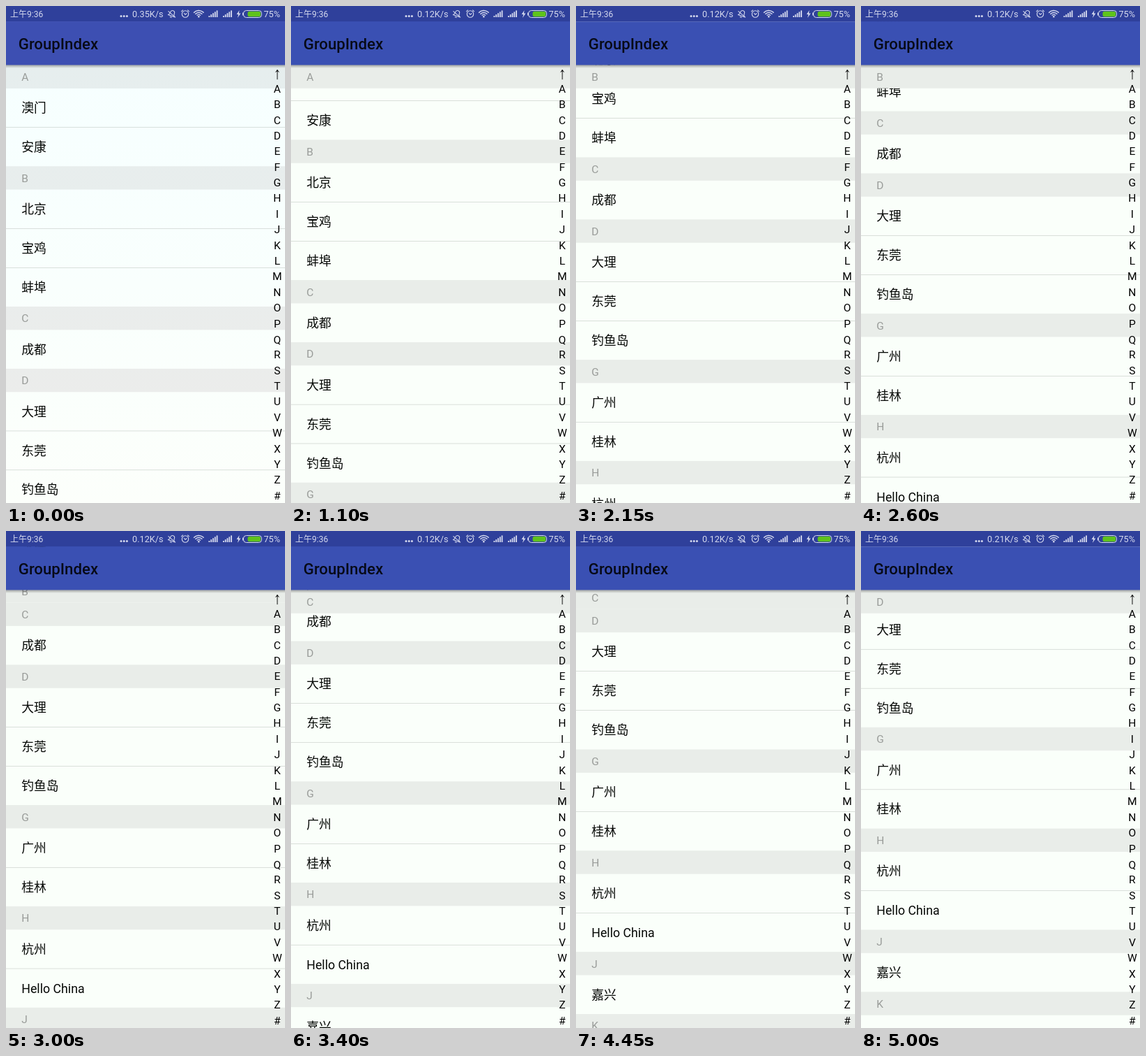
Recreate the animation shown at these times as an HTML page with a canvas. Size 400x711 px, loop 5.05 s.

```html
<!DOCTYPE html>
<html lang="zh-CN">
<head>
<meta charset="utf-8">
<style>
  html, body { margin: 0; width: 100%; height: 100%; overflow: hidden; background: #fafffa; }
  canvas { display: block; width: 400px; height: 711px; }
</style>
</head>
<body>
<canvas id="stage"></canvas>
<script>
const W = 400, H = 711, LOOP = 5050, STEP = 50;
const U = 400 / 1080;               // phone pixels to stage pixels
const LIST_TOP = 228 * U, HEAD = 90 * U, ROW = 150 * U, LINE = U;
const FONT = 'Roboto, "Noto Sans CJK SC", "Noto Sans CJK", sans-serif';
const INDEX = '↑ABCDEFGHIJKLMNOPQRSTUVWXYZ#';
const GROUPS = [
  ['A', '澳门', '安康'],
  ['B', '北京', '宝鸡', '蚌埠'],
  ['C', '成都'],
  ['D', '大理', '东莞', '钓鱼岛'],
  ['G', '广州', '桂林'],
  ['H', '杭州', 'Hello China'],
  ['J', '嘉兴'],
  ['K', '']
];
const SCROLL = [[850, 0], [1100, 37.9], [1650, 130.3], [2600, 279.5],
  [3400, 361.4], [3950, 381.3], [5000, 438.8]];

const canvas = document.getElementById('stage');
const ctx = canvas.getContext('2d');
const dpr = window.devicePixelRatio || 1;
canvas.width = Math.round(W * dpr);
canvas.height = Math.round(H * dpr);

// Lay the list out once, in unscrolled stage coordinates.
let cursor = LIST_TOP;
const sections = GROUPS.map(([label, ...names]) => {
  const top = cursor;
  cursor += HEAD;
  const rows = names.map((name, i) => {
    if (i) cursor += LINE;
    const row = { name, top: cursor, divided: i < names.length - 1 };
    cursor += ROW;
    return row;
  });
  return { label, top, rows };
});

// Monotone cubic through the scroll keys.
const slopes = SCROLL.slice(1).map(([t, y], i) => (y - SCROLL[i][1]) / (t - SCROLL[i][0]));
const tangents = SCROLL.map((_, i) => {
  const a = slopes[i - 1], b = slopes[i];
  if (a === undefined) return b;
  if (b === undefined) return a;
  return 2 * a * b / (a + b);
});
function scrollAt(t) {
  if (t <= SCROLL[0][0]) return 0;
  let i = 0;
  while (i < SCROLL.length - 2 && t > SCROLL[i + 1][0]) i++;
  const [t0, y0] = SCROLL[i], [t1, y1] = SCROLL[i + 1];
  const d = t1 - t0, u = Math.min(1, (t - t0) / d), v = 1 - u;
  return y0 * v * v * (1 + 2 * u) + y1 * u * u * (3 - 2 * u)
    + d * u * v * (tangents[i] * v - tangents[i + 1] * u);
}

function rect(x, y, w, h, color) {
  ctx.fillStyle = color;
  ctx.fillRect(x, y, w, h);
}
function text(str, x, y, size, color, align = 'left', weight = 400) {
  ctx.font = `${weight} ${size}px ${FONT}`;
  ctx.textAlign = align;
  ctx.fillStyle = color;
  ctx.fillText(str, x, y);
}
function path(points) {
  ctx.beginPath();
  points.forEach(([x, y]) => ctx.lineTo(x, y));
}
function stroke(points) {
  path(points);
  ctx.stroke();
}
function arc(x, y, r, from = 0, to = Math.PI * 2) {
  ctx.beginPath();
  ctx.arc(x, y, r, from, to);
}
function pill(x, y, w, h, r) {
  ctx.beginPath();
  ctx.roundRect(x, y, w, h, r);
}
function shade(top, bottom, from, to) {
  const g = ctx.createLinearGradient(0, top, 0, bottom);
  g.addColorStop(0, from);
  g.addColorStop(1, to);
  return g;
}

function drawHeader(label, y, color) {
  rect(0, y, W, HEAD, color);
  const size = 42 * U;
  text(label, 60 * U, y + HEAD / 2 + size * 0.37, size, '#999c99');
}

function drawList(scroll, still) {
  const paper = still ? shade(LIST_TOP, H, '#f6ffff', '#fcfffb') : '#fafffa';
  const band = still ? shade(LIST_TOP, H, '#e6eeee', '#edecea') : '#e9ede9';
  rect(0, LIST_TOP, W, H - LIST_TOP, paper);
  const size = 48 * U;
  for (const section of sections) {
    drawHeader(section.label, section.top - scroll, band);
    for (const row of section.rows) {
      const y = row.top - scroll;
      text(row.name, 60 * U, y + ROW / 2 + size * 0.37, size, '#060806');
      if (row.divided) rect(0, y + ROW, W, LINE, '#a2a8a4');
    }
  }
  // The pinned header is pushed up by the next one.
  const pinned = sections.findLastIndex(s => s.top - scroll <= LIST_TOP + 0.01);
  const next = sections[pinned + 1];
  const limit = next ? next.top - scroll - HEAD : LIST_TOP;
  drawHeader(sections[pinned].label, Math.min(LIST_TOP, limit), band);
}

function drawIndex() {
  const cell = (1920 * U - LIST_TOP) / INDEX.length;
  [...INDEX].forEach((letter, i) => {
    const y = LIST_TOP + cell * (i + 0.5);
    if (!i) return drawArrow(389, y + 2);
    ctx.font = `400 ${42 * U}px ${FONT}`;
    const m = ctx.measureText(letter);
    const height = m.actualBoundingBoxAscent + m.actualBoundingBoxDescent;
    text(letter, 1050 * U, y + height / 2 + 0.3, 42 * U, '#000', 'center');
  });
}
function drawArrow(x, y) {
  ctx.strokeStyle = ctx.fillStyle = '#111';
  ctx.lineWidth = 1;
  stroke([[x, y - 6], [x, y + 7.5]]);
  path([[x, y - 7], [x + 3.2, y - 2.3], [x, y - 4.3], [x - 3.2, y - 2.3]]);
  ctx.fill();
}

function drawBars(speed, still) {
  rect(0, 0, W, 60 * U, '#2f409b');
  rect(0, 60 * U, W, 168 * U, still ? '#3d4fb2' : '#3a50b3');
  rect(0, LIST_TOP, W, 4.5, shade(LIST_TOP, LIST_TOP + 4.5, 'rgba(0,0,0,.3)', 'rgba(0,0,0,0)'));
  text('GroupIndex', 48 * U, 62.2, 60 * U, 'rgba(0,0,0,.87)', 'left', 500);

  const ink = '#d5d9ee';
  text('上午9:36', 6, 16.2, 12, ink);
  text(speed, 225.6, 16.2, 12.7, ink, 'right');
  text('75%', 393, 16.2, 12.7, ink, 'right');
  [165, 169.2, 173.4].forEach(x => { arc(x, 14.6, 1.5); ctx.fill(); });
  drawBell(238, 11.3, ink);
  drawAlarm(257, 11.5);
  drawWifi(276.3, 16);
  drawSignal(290.5);
  drawSignal(311);
  drawBattery(ink);
}
function drawBell(x, y, ink) {
  ctx.strokeStyle = ink;
  ctx.lineWidth = 1.1;
  ctx.save();
  ctx.translate(x, y);
  ctx.rotate(0.35);
  ctx.beginPath();
  ctx.moveTo(-4.5, 3);
  ctx.quadraticCurveTo(-3, 1, -3, -1.5);
  ctx.bezierCurveTo(-3, -6, 3, -6, 3, -1.5);
  ctx.quadraticCurveTo(3, 1, 4.5, 3);
  ctx.closePath();
  ctx.stroke();
  stroke([[-1.5, 5], [1.5, 5]]);
  ctx.restore();
  stroke([[x - 5.5, y - 4], [x + 5, y + 5]]);
}
function drawAlarm(x, y) {
  arc(x, y, 4.7);
  ctx.stroke();
  stroke([[x - 2, y - 1.5], [x, y + 0.8], [x + 2.3, y - 1]]);
  stroke([[x - 5.8, y - 3.4], [x - 3.2, y - 5.8]]);
  stroke([[x + 5.8, y - 3.4], [x + 3.2, y - 5.8]]);
}
function drawWifi(x, y) {
  ctx.lineWidth = 1.5;
  [3.6, 6.6, 9.6].forEach(r => {
    arc(x, y, r, -Math.PI * 0.77, -Math.PI * 0.23);
    ctx.stroke();
  });
  arc(x, y - 0.8, 1.3);
  ctx.fill();
}
function drawSignal(x) {
  for (let i = 0; i < 5; i++) {
    const h = 2 + i * 1.9;
    ctx.fillRect(x + i * 2.8, 16 - h, 1.8, h);
  }
}
function drawBattery(ink) {
  path([[334.6, 6], [330.6, 12], [333.2, 12], [332, 17], [336.4, 10.4], [333.8, 10.4]]);
  ctx.fill();
  ctx.strokeStyle = ink;
  ctx.lineWidth = 1;
  pill(340.5, 6.5, 26, 10, 4);
  ctx.stroke();
  rect(339, 9.5, 1.2, 4, ink);
  ctx.fillStyle = '#5fc31c';
  pill(346.5, 7.7, 18.7, 7.6, 2.5);
  ctx.fill();
}

function draw(t) {
  const still = t < 900;
  const speed = still ? '0.35K/s' : t < 4900 ? '0.12K/s' : '0.21K/s';
  ctx.setTransform(dpr, 0, 0, dpr, 0, 0);
  drawList(scrollAt(t), still);
  drawIndex();
  drawBars(speed, still);
}

const start = performance.now();
function tick() {
  const t = (performance.now() - start) % LOOP;
  draw(Math.floor(t / STEP) * STEP);
  requestAnimationFrame(tick);
}
tick();
</script>
</body>
</html>
```
